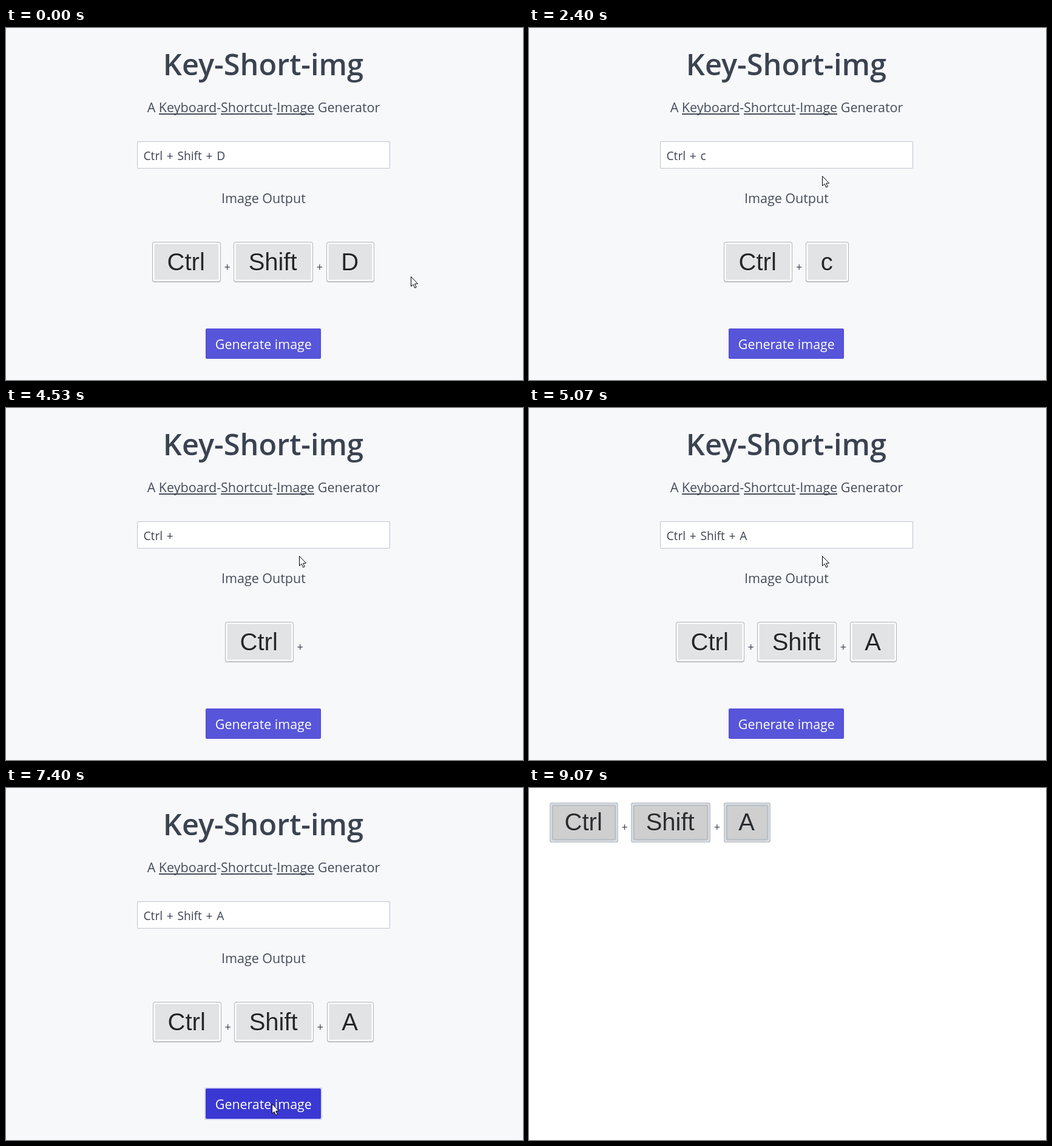
Recreate the animation shown at these times as an HTML page with a canvas. Size 852 by 581 pixels, loop 9.47 s.

```html
<!DOCTYPE html>
<html lang="en">
<head>
<meta charset="utf-8">
<title>Key-Short-img</title>
<style>
  html, body { margin: 0; width: 100%; height: 100%; overflow: hidden; background: #f7f8f9; }
  canvas { display: block; width: 852px; height: 581px; }
</style>
</head>
<body>
<canvas id="stage" width="852" height="581"></canvas>
<script>
const ctx = document.getElementById('stage').getContext('2d');
const UI = '"Open Sans", "Noto Sans", sans-serif';
const KEY_FONT = '40px "Liberation Sans", Arial, sans-serif';
const INK = '#3b4351', SOFT_INK = '#454d5b';
const MID = 424;

// All times below are ticks of a 15 Hz clock.
const LOOP = 9470, RATE = 15;
const PRESS = 105, RESULT = 112;

const typing = [
  { from: 0, value: 'Ctrl + Shift + D', eraseFrom: 9 },
  { from: 36, value: 'Ctrl + c' },
  { from: 46, value: 'Ctrl +' },
  { from: 52, value: 'Ctrl + v' },
  { from: 68, value: 'Ctrl +' },
  { from: 72, value: 'Ctrl + Shift +' },
  { from: 76, value: 'Ctrl + Shift + A' }
];

const glides = [
  { from: 0, to: 3, x: 673, y: 280 },
  { from: 6, to: 12, x: 485, y: 246 },
  { from: 26, to: 28, x: 483, y: 244 },
  { from: 84, to: 91, x: 418, y: 575 },
  { from: 92, to: 95, x: 438, y: 521 },
  { from: 129, to: 136, x: 97, y: 590 }
];

const clamp = v => Math.min(1, Math.max(0, v));
const ease = u => u * u * (3 - 2 * u);
const mix = (a, b, u) => a + (b - a) * u;

function fieldValue(tick) {
  const { value, eraseFrom } = typing.findLast(s => s.from <= tick);
  if (!(tick > eraseFrom)) return value;
  return value.slice(0, Math.max('Ctrl +'.length, value.length - 2 * (tick - eraseFrom)));
}

function pointerAt(tick) {
  let x = 667, y = 410;
  for (const g of glides) {
    const u = ease(clamp((tick - g.from) / (g.to - g.from)));
    x = mix(x, g.x, u);
    y = mix(y, g.y, u);
  }
  return { x: Math.round(x), y: Math.round(y) };
}

function text(str, x, y, font, color = INK, align = 'left') {
  ctx.font = font;
  ctx.fillStyle = color;
  ctx.textAlign = align;
  ctx.fillText(str, x, y);
}

function widthOf(str, font) {
  ctx.font = font;
  return ctx.measureText(str).width;
}

function box(x, y, w, h, r, color) {
  ctx.fillStyle = color;
  ctx.beginPath();
  ctx.roundRect(x, y, w, h, r);
  ctx.fill();
}

// Nested boxes: [inset, radius, colour]
const liveCap = {
  layers: [[0, 4, '#adb3b9'], [1, 3, '#fff'], [3.5, 1, '#e1e3e5']],
  ink: '#242729', glow: '#fff', baseline: 47
};
const savedCap = {
  layers: [[0, 3, '#bcc3c9'], [1.5, 3, '#dfe2e5'], [3.5, 3, '#b9c0c6'], [6, 1, '#cfcfcf']],
  ink: '#2b2c2f', glow: '#e4e4e4', baseline: 46
};

function keyCap(label, x, y, w, cap) {
  if (cap === liveCap) box(x, y + 1, w, 66, 4, '#cbcdcf');
  for (const [inset, r, color] of cap.layers)
    box(x + inset, y + inset, w - 2 * inset, 66 - 2 * inset, r, color);
  const tx = x + w / 2 - 0.8, ty = y + cap.baseline;
  text(label, tx, ty + 1, KEY_FONT, cap.glow, 'center');
  text(label, tx, ty, KEY_FONT, cap.ink, 'center');
}

function shortcut(value, y, cap, left) {
  const gap = 21.6, padding = 50.6;
  const open = value.endsWith('+');
  const labels = value.split('+').map(s => s.trim()).filter(Boolean);
  const widths = labels.map(s => widthOf(s, KEY_FONT) + padding);
  const total = widths.reduce((a, b) => a + b) + gap * (labels.length - 1) + (open ? 13.2 : 0);
  let x = left ?? MID - total / 2;
  labels.forEach((label, i) => {
    const start = Math.round(x);
    x += widths[i];
    keyCap(label, start, y, Math.round(x) - start, cap);
    if (open || i < labels.length - 1)
      text('+', x + gap / 2, y + cap.baseline + 1, '18px ' + UI, INK, 'center');
    x += gap;
  });
}

function subtitle() {
  const font = '21.5px ' + UI;
  const parts = 'A |Keyboard|-|Shortcut|-|Image| Generator'.split('|');
  let x = MID + 0.5 - widthOf(parts.join(''), font) / 2;
  parts.forEach((part, i) => {
    const w = widthOf(part, font);
    text(part, x, 139, font, SOFT_INK);
    if (i % 2) box(Math.round(x), 141, Math.round(w), 2, 0, SOFT_INK);
    x += w;
  });
}

function button(tick, { x, y }) {
  const hover = x >= 329 && x <= 519 && y >= 496 && y <= 546;
  const press = clamp((tick - PRESS + 1) / 5);
  const rest = hover ? [66, 64, 212] : [87, 85, 217];
  const fill = [58, 56, 210].map((c, i) => Math.round(mix(rest[i], c, press)));
  box(327, 494, 194, 54, 3, `rgba(87,85,217,${0.2 * press})`);
  box(329, 496, 190, 50, 2, hover ? '#3a38d2' : '#4b48d6');
  box(330, 497, 188, 48, 1, `rgb(${fill})`);
  text('Generate image', MID + 0.3, 530, '21.4px ' + UI, '#fff', 'center');
}

function formPage(tick, mouse) {
  box(0, 0, 852, 581, 0, '#f7f8fa');
  text('Key-Short-img', MID, 78, '600 48.7px ' + UI, INK, 'center');
  subtitle();

  box(216, 187, 417, 45, 2, '#bcc3ce');
  box(217, 188, 415, 43, 1, '#fff');
  const value = fieldValue(tick);
  ctx.wordSpacing = '1.7px';
  text(value, 226.5, 218, '19.2px ' + UI);
  ctx.wordSpacing = '0px';

  text('Image Output', MID + 0.4, 289, '21.5px ' + UI, SOFT_INK, 'center');
  shortcut(value, 353, liveCap);
  button(tick, mouse);
}

function resultPage() {
  box(0, 0, 852, 581, 0, '#fff');
  shortcut('Ctrl + Shift + A', 24, savedCap, 34);
}

const arrow = new Path2D('M0 0V16L3.6 12.7 6.2 18.5 8.7 17.4 6.2 11.8 11 11.6Z');
const resize = new Path2D('M0 0L4.5 4.5H1.5V20H-1.5V4.5H-4.5Z');

function pointer({ x, y }, shape) {
  ctx.save();
  ctx.translate(x + 0.5, y + 0.5);
  ctx.fillStyle = '#fff';
  ctx.strokeStyle = '#000';
  ctx.fill(shape);
  ctx.stroke(shape);
  ctx.restore();
}

function draw(ms) {
  const tick = Math.floor(ms / 1000 * RATE + 0.1);
  const mouse = pointerAt(tick);
  const onForm = tick < RESULT;
  if (onForm) formPage(tick, mouse);
  else resultPage();
  pointer(mouse, onForm && mouse.y > 570 ? resize : arrow);
}

const start = performance.now();
function frame() {
  draw((performance.now() - start) % LOOP);
  requestAnimationFrame(frame);
}
frame();
</script>
</body>
</html>
```
